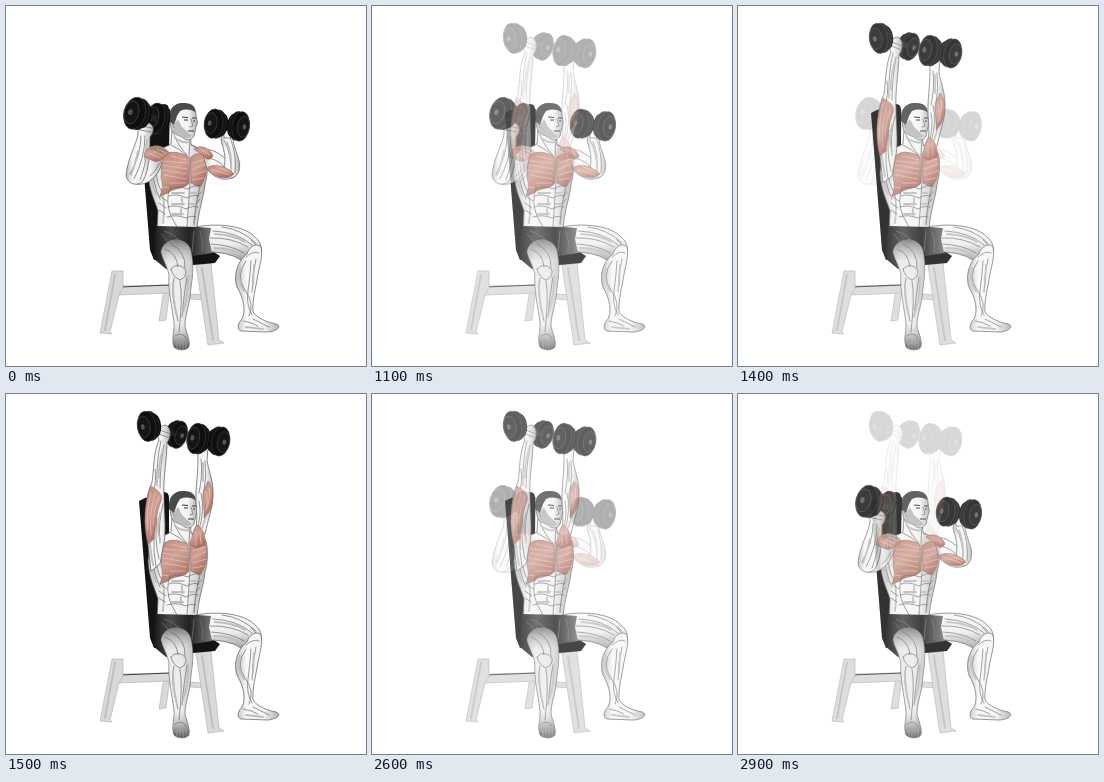
An HTML page that plays this animation: 360x360 px, repeating every 3 s.

```html
<!DOCTYPE html>
<html lang="en">
<head>
<meta charset="utf-8">
<title>Seated dumbbell press</title>
<style>
@property --lift { syntax: "<number>"; inherits: true; initial-value: 0; }
html, body { margin: 0; width: 100%; height: 100%; overflow: hidden; background: #fff; }
svg { display: block; width: 100vw; height: 100vh; animation: press 3s step-end infinite; }
#down { opacity: calc(1 - var(--lift)); }
#up { opacity: var(--lift); }
@keyframes press {
  0% { --lift: 0; }
  33.33% { --lift: .167; }
  36.66% { --lift: .333; }
  40% { --lift: .5; }
  43.33% { --lift: .667; }
  46.66% { --lift: .833; }
  50% { --lift: 1; }
  83.33% { --lift: .833; }
  86.66% { --lift: .667; }
  90% { --lift: .5; }
  93.33% { --lift: .333; }
  96.66% { --lift: .167; }
  100% { --lift: 0; }
}
.skin { fill: url(#skin); stroke: #5c5c5c; stroke-width: .7; stroke-linejoin: round; }
.line { fill: none; stroke: #6a6a6a; stroke-width: .7; stroke-linecap: round; }
.soft { fill: none; stroke: #bdbdbd; stroke-width: 1.8; stroke-linecap: round; }
.red { fill: url(#red); stroke: #8d5a50; stroke-width: .5; }
.fiber { fill: none; stroke: #e8c5bc; stroke-width: .7; stroke-linecap: round; }
.dark { fill: #131313; }
.steel { fill: #d9d9d9; stroke: #adadad; stroke-width: .6; stroke-linejoin: round; }
</style>
</head>
<body>
<svg viewBox="0 0 360 360">
<defs>
  <linearGradient id="skin">
    <stop offset="0" stop-color="#bcbcbc"/>
    <stop offset=".25" stop-color="#f8f8f8"/>
    <stop offset=".65" stop-color="#f4f4f4"/>
    <stop offset="1" stop-color="#b0b0b0"/>
  </linearGradient>
  <linearGradient id="thigh" x2=".15" y2="1">
    <stop offset="0" stop-color="#fafafa"/>
    <stop offset=".6" stop-color="#eee"/>
    <stop offset="1" stop-color="#a8a8a8"/>
  </linearGradient>
  <linearGradient id="shin" x2="0" y2="1">
    <stop offset="0" stop-color="#777"/>
    <stop offset=".2" stop-color="#ddd" stop-opacity=".5"/>
    <stop offset=".75" stop-color="#ddd" stop-opacity=".2"/>
    <stop offset="1" stop-color="#4c4c4c"/>
  </linearGradient>
  <linearGradient id="red" x2=".5" y2="1">
    <stop offset="0" stop-color="#c18a7d"/>
    <stop offset=".5" stop-color="#d0a196"/>
    <stop offset="1" stop-color="#ae7062"/>
  </linearGradient>
  <linearGradient id="cloth">
    <stop offset="0" stop-color="#161616"/>
    <stop offset=".3" stop-color="#4a4a4a"/>
    <stop offset=".62" stop-color="#222"/>
    <stop offset="1" stop-color="#777"/>
  </linearGradient>

  <g id="plates">
    <ellipse cx="5" rx="7" ry="12.5" fill="#0a0a0a"/>
    <ellipse cx="1" rx="9" ry="15" fill="#121212" stroke="#2c2c2c" stroke-width=".7"/>
    <ellipse cx="-3" rx="9.5" ry="15.5" fill="#0e0e0e" stroke="#3c3c3c" stroke-width=".6"/>
    <ellipse cx="-6" rx="6.5" ry="11" fill="#151515" stroke="#4c4c4c" stroke-width=".6"/>
    <ellipse cx="-7" rx="2" ry="2.8" fill="#555"/>
  </g>

  <g id="bench">
    <path class="steel" d="M158 283H164L160 314 153 315Z"/>
    <path class="steel" d="M114 280 164 279V287L113 289ZM184 288 200 289V294L184 293Z"/>
    <path d="M114 281 164 279" stroke="#444" stroke-width="1.2"/>
    <path class="steel" d="M106 265H117L117 282 113 289 104 326 106 328 94 327Z"/>
    <path class="steel" d="M190 259 205 257 213 334 218 337 202 339Z"/>
    <path class="soft" d="M109 269 99 324M196 262 207 334"/>
    <path class="dark" d="M133 107 139 104 158 98Q163 98 163 104L163 145 157 252 148 254 144 244Z"/>
    <path class="dark" d="M145 246 200 241 214 250 209 257 187 259 160 259Z"/>
  </g>

  <g id="body">
    <path class="skin" d="M166 124 165 138C157 143 147 143 144 151L142 167C143 185 149 195 152 205L151 224H191C192 205 198 191 199 178 202 168 202 156 200 147 195 142 188 141 185 138L184 126Z"/>
    <path class="line" d="M168 129Q173 141 181 149M184 132 183 149M165 139Q174 143 181 150M185 139Q193 142 199 147M146 158Q147 179 154 193M150 160Q150 178 156 186"/>
    <path class="soft" d="M169 132Q178 138 183 136M157 190Q159 200 157 217M193 184Q191 197 188 217M144 160Q145 177 150 188"/>
    <path class="red" d="M156 152C160 144 174 145 182 151L183 177C178 184 168 181 162 187L154 190Q158 180 155 172Z"/>
    <path class="red" d="M184 152C190 146 197 147 200 151 201 165 199 177 193 181L185 177Z"/>
    <path class="fiber" d="M158 155 181 157M157 159 181 163M157 164 180 168M158 169 180 173M165 150 181 154M164 177 179 177M156 181 163 182M187 157 199 153M187 163 200 158M187 169 200 165M187 174 198 172"/>
    <path class="line" d="M183 150 184 177 181 221M164 183Q171 179 182 183Q190 178 196 180M163 190Q170 187 181 192Q188 188 193 190M162 201Q170 198 180 203Q187 199 192 201M161 211Q170 208 180 212Q187 209 190 211M164 181Q159 196 165 210L171 221M194 181Q189 199 188 219"/>
    <path class="line" d="M154 190 161 195M153 197 160 202M153 204 159 208M195 186 191 191M194 193 190 198"/>
    <path class="soft" d="M166 187H178M166 198H178M166 208H177M185 187H190M184 198H189M176 192V199M175 203V209"/>

    <path class="skin" d="M164 108C164 101 171 97 179 98 187 98 190 103 190 109L191.500 117 190 121 188 130C185 135 180 135 176 131L167 127C164 121 164 114 164 108Z"/>
    <path fill="#4a4a4a" d="M163 115C162 103 169 96 178 97 186 97 190 101 189 106 184 103 179 103 174 105L171 110 168 119Z"/>
    <path fill="#bbb" d="M168 119 172 113 176 121 186 130Q182 135 176 131L167 126Z"/>
    <path d="M176 111 182 111.500M186 112H190M178 114H182M187 115H189M182 125H188" fill="none" stroke="#333" stroke-width="1"/>
    <path class="line" d="M185 113 187 120 184 121M168 115Q165 117 168 122"/>

    <path class="skin" style="fill:url(#thigh)" d="M190 221C210 217 238 219 249 231 258 238 256 249 252 255L235 254Q222 245 196 246Z"/>
    <path class="line" d="M207 225Q231 226 246 239M216 221Q235 223 250 237M204 232Q225 231 242 241M205 238Q225 239 238 247M245 234Q253 239 250 248"/>
    <path class="soft" d="M208 242Q226 242 237 250M209 228Q228 229 239 236"/>
    <path class="skin" d="M241 248C229 257 228 273 231 281 238 293 240 305 236 313 231 318 231 324 235 325L262 326C272 325 276 320 270 318 260 316 251 312 247 306 246 295 250 281 252 268 254 258 257 249 255 241 250 236 243 241 241 248Z"/>
    <path class="line" d="M240 251Q248 244 253 247M240 255Q229 270 239 284T243 310M245 255Q244 271 242 285T246 309M250 253Q246 270 246 286M237 315Q245 316 252 320M247 313 263 321"/>
    <path class="soft" d="M234 262Q231 274 238 285M240 321 257 323M248 259 247 279"/>

    <path fill="url(#cloth)" d="M150 220 192 221 205 222 203 233 206 247 187 250 176 258 160 263 147 252Z"/>
    <path d="M155 228Q163 233 165 247M158 225Q174 230 179 243M188 225 186 246M194 225Q198 236 196 246" fill="none" stroke="#777" stroke-width=".7"/>
    <path class="skin" d="M155 246C157 232 177 229 184 242 188 255 187 268 185 281 184 300 178 311 179 321 182 330 185 339 182 342 178 345 171 344 168 341 165 332 169 324 168 316 166 300 162 285 163 268 161 260 157 254 155 246Z"/>
    <path fill="url(#shin)" d="M155 246C157 232 177 229 184 242 188 255 187 268 185 281 184 300 178 311 179 321 182 330 185 339 182 342 178 345 171 344 168 341 165 332 169 324 168 316 166 300 162 285 163 268 161 260 157 254 155 246Z"/>
    <path class="line" d="M159 243Q171 247 172 261M165 238Q180 245 179 262M165 263Q172 255 180 264Q181 271 174 274Q167 271 165 263M168 272Q164 287 172 315M174 275Q177 291 173 326M181 271Q178 288 176 311M169 330Q175 325 180 332"/>
    <path class="soft" d="M182 270Q182 291 177 306M167 277Q167 294 171 310"/>
    <path d="M171 336V343M174 335V344M177 335V344M180 336V343" stroke="#bbb" stroke-width=".6"/>
  </g>
</defs>

<g id="down">
  <use href="#bench"/>
  <path class="dark" d="M143 106 164 103 163 143 143 139Z"/>
  <use href="#body"/>
  <use href="#plates" transform="translate(152 113) rotate(14)"/>
  <path d="M137 110 151 113" stroke="#222" stroke-width="6"/>
  <path class="skin" d="M148 142C137 143 137 155 127 162 121 167 120 174 130 178 142 180 152 170 156 158Z"/>
  <path class="skin" d="M120 169C122 151 130 140 132 128 131 120 137 114 143 117 149 120 148 126 144 131 144 149 143 164 137 175 131 181 121 178 120 169Z"/>
  <path class="line" d="M135 130Q135 149 124 168M139 130Q139 152 128 173M142 143Q139 161 134 174M134 124 145 126M135 120 146 122M144 170Q151 164 153 158"/>
  <path class="soft" d="M132 145Q129 159 125 169M141 134 139 154"/>
  <path class="red" d="M139 146C144 137 158 138 163 147L156 153C148 159 145 152 138 151Z"/>
  <path d="M143 143Q154 138 162 146L154 148Z" fill="#8a7772" opacity=".7"/>
  <path class="fiber" d="M142 147 154 152M147 144 157 150M151 143 160 147"/>
  <use href="#plates" transform="translate(132 108) rotate(14) scale(1.13 1.05)"/>

  <path class="skin" d="M196 144C210 141 215 152 227 156 235 164 232 172 222 173 211 175 203 166 200 160Z"/>
  <path class="skin" d="M216 126C220 116 228 117 229 125L227 133C228 145 236 154 233 165 229 175 219 173 217 164 222 151 216 140 215 134Z"/>
  <path class="line" d="M218 134Q226 148 225 168M224 131Q231 149 229 167M218 123 227 125M217 128 227 130M203 152Q215 155 220 163"/>
  <path class="soft" d="M221 136Q226 149 225 161M212 171Q218 174 225 171"/>
  <path class="red" d="M188 143C195 138 204 142 207 150 204 155 200 154 197 149Z"/>
  <path class="red" d="M202 161C210 157 222 161 228 168 221 174 211 172 203 166Z"/>
  <path class="fiber" d="M194 143 204 149M205 163 223 169M210 160 225 167"/>
  <path d="M214 118 232 120" stroke="#222" stroke-width="5"/>
  <path class="skin" d="M217 117Q222 112 227 117L225 132 218 132Z"/>
  <use href="#plates" transform="translate(232 120) rotate(8) scale(-.92 .96)"/>
  <use href="#plates" transform="translate(210.500 118) rotate(8) scale(.98 .95)"/>
</g>

<g id="up">
  <use href="#bench"/>
  <use href="#body"/>
  <use href="#plates" transform="translate(170 40) rotate(16) scale(-.9 .9)"/>
  <path d="M146 34 169 40" stroke="#222" stroke-width="5"/>
  <path class="skin" d="M153 46C147 60 148 76 146 88 140 100 138 122 141 142L145 177 154 170 157 153C161 141 158 118 158 102 157 84 161 65 161 49 166 42 165 32 159 31 152 32 150 41 153 46Z"/>
  <path class="line" d="M155 47Q150 68 151 92M158 51Q154 74 154 94M149 75Q151 86 147 101M154 36 164 40M153 40 164 44M148 143Q147 157 150 173M157 110Q152 128 154 149M151 124Q148 145 153 165"/>
  <path class="soft" d="M157 55Q152 71 153 84M154 119Q150 136 154 145M143 145Q145 158 147 171"/>
  <path class="red" d="M145 92C151 96 157 99 155 107 151 116 150 127 148 145L142 150C137 133 138 108 145 92Z"/>
  <path class="fiber" d="M145 99Q140 117 142 135M149 99Q143 118 145 141M153 103Q147 116 147 131"/>
  <use href="#plates" transform="translate(143.500 32) rotate(-8) scale(.97 .98)"/>

  <path class="skin" d="M192 62C190 52 196 49 202 55L201 66C202 75 208 88 207 101 207 114 202 125 199 140L187 142C194 131 189 112 190 98 191 83 192 76 192 62Z"/>
  <path class="line" d="M195 65Q197 81 193 99M199 67Q201 82 198 97M195 99Q199 116 193 136M193 107Q196 121 191 135"/>
  <path class="soft" d="M197 69V87M202 114Q199 126 196 134"/>
  <path class="red" d="M202 87C208 94 208 107 203 118L198 124C199 113 195 104 198 96Z"/>
  <path class="red" d="M183 150C188 143 186 135 191 131 197 134 200 142 199 151L190 154Z"/>
  <path class="fiber" d="M203 94Q205 103 201 114M200 98Q203 106 200 116M190 137 190 151M194 138 195 150"/>
  <path d="M194 43 211 46" stroke="#222" stroke-width="5"/>
  <use href="#plates" transform="translate(212 47) rotate(10) scale(-.94 .95)"/>
  <use href="#plates" transform="translate(193 45) rotate(10) scale(.96 1)"/>
</g>
</svg>
</body>
</html>
```
